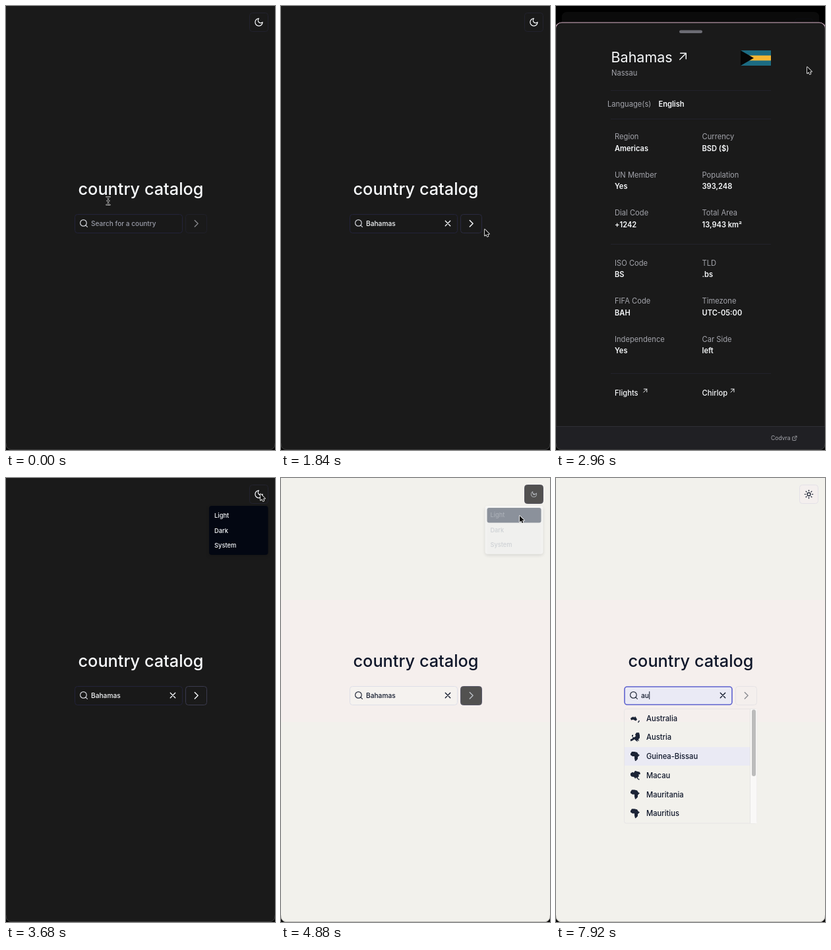
Recreate the animation shown at these times as an HTML page with a canvas. Size 408x670 px, loop 8000 ms.

```html
<!DOCTYPE html>
<html lang="en">
<head>
<meta charset="utf-8">
<title>country catalog</title>
<style>
html, body { margin: 0; width: 100%; height: 100%; overflow: hidden; background: #000; }
canvas { display: block; width: 408px; height: 670px; }
</style>
</head>
<body>
<canvas id="stage"></canvas>
<script>
const W = 408, H = 670, LOOP = 8000;
const canvas = document.getElementById('stage');
const ctx = canvas.getContext('2d');
const dpr = window.devicePixelRatio || 1;
canvas.width = W * dpr;
canvas.height = H * dpr;

const T = { focus: 320, pick: 1280, open: 2060, close: 3110, menu: 3600, theme: 4840, clear: 5760, type: 6230 };

const QUERY = [[0, ''], [480, 'b'], [640, 'ba'], [800, 'bah'], [T.pick, 'Bahamas'],
  [T.clear, ''], [T.type, 'a'], [7200, 'au']];

// Each row: country, then the initial of its continent
const RESULTS = {
  b: { total: 50, rows: 'Albania e|Antigua and Barbuda m|Aruba m|Azerbaijan s|Bahamas m|Bahrain s' },
  ba: { total: 20, rows: 'Albania e|Antigua and Barbuda m|Azerbaijan s|Bahamas m|Bahrain s|Bangladesh s' },
  bah: { total: 2, rows: 'Bahamas m|Bahrain s' },
  a: { total: 206, rows: 'Afghanistan s|Albania e|Algeria f|American Samoa o|Andorra e|Angola f' },
  au: { total: 10.2, rows: 'Australia o|Austria e|Guinea-Bissau f|Macau s|Mauritania f|Mauritius f' }
};

const LAND = {
  s: 'M1 5 4 3 6 4 8 1 11 2 15 3 16 6 13 7 14 9 12 11 13 14 11 13 10 11 8 13 7 11 5 10 3 10 1 8ZM13 13l2 1-1 1-2-1Z',
  e: 'M10 1 14 1 15 5 15 9 13 11 14 14 11 12 12 15 9 13 7 11 4 13 1 14 1 11 4 10 4 8 7 8 9 6 8 4ZM3 5l2-1 0 3-2 0Z',
  f: 'M3 1 7 1 11 2 13 5 15 6 12 9 12 12 9 15 8 15 7 11 7 8 4 8 1 6 1 4Z',
  o: 'M1 8 4 6 6 6 7 7 8 5 10 8 11 10 9 12 7 11 5 10 2 11ZM14 11l1 1-2 3-1-1Z',
  m: 'M2 1 10 1 11 3 8 5 6 6 8 8 12 10 11 12 9 15 8 15 8 11 6 8 4 6 3 4 1 3Z'
};

const ICON = {
  moon: 'M12 3a6 6 0 0 0 9 9 9 9 0 1 1-9-9Z',
  sun: 'M16 12a4 4 0 1 1-8 0 4 4 0 1 1 8 0M12 2v2M12 20v2M2 12h2M20 12h2M4.9 4.9l1.4 1.4M17.7 17.7l1.4 1.4M4.9 19.1l1.4-1.4M17.7 6.3l1.4-1.4',
  search: 'M19 11a8 8 0 1 1-16 0 8 8 0 1 1 16 0M21 21l-4.3-4.3',
  cross: 'M18 6 6 18M6 6l12 12',
  chevron: 'M9 18l6-6-6-6',
  arrow: 'M7 17 17 7M8 7h9v9',
  external: 'M18 13v6a2 2 0 0 1-2 2H5a2 2 0 0 1-2-2V8a2 2 0 0 1 2-2h6M15 3h6v6M10 14 21 3'
};

// Pointer path: time, x, y
const PATH = [
  [80, 155, 290], [320, 165, 328], [1040, 165, 328], [1200, 160, 362], [T.pick, 160, 362],
  [1700, 309, 337], [1850, 309, 337], [2000, 290, 330], [2120, 290, 330], [2880, 381, 92],
  [2970, 381, 92], [3090, 384, 14], [3200, 384, 14], [3480, 386, 24], [3800, 386, 24],
  [4200, 362, 57], [5250, 362, 57], [5720, 252, 326], [5900, 252, 326], [6120, 200, 328]
];

const clamp = x => Math.max(0, Math.min(1, x));
const smooth = x => x * x * (3 - 2 * x);
const span = (t, start, length) => clamp((t - start) / length);
const glide = x => 1 - Math.pow(1 - x, 3.6);

function mix(a, b, p) {
  const part = (c, i) => parseInt(c.substr(1 + 2 * i, 2), 16);
  return 'rgb(' + [0, 1, 2].map(i => Math.round(part(a, i) + (part(b, i) - part(a, i)) * p)) + ')';
}

function latest(list, t) {
  return list.filter(e => e[0] <= t).pop()[1];
}

function pointerAt(t) {
  const i = PATH.findIndex(k => k[0] > t);
  if (i === 0) return PATH[0].slice(1);
  if (i < 0) return PATH[PATH.length - 1].slice(1);
  const a = PATH[i - 1], b = PATH[i], p = smooth(span(t, a[0], b[0] - a[0]));
  return [a[1] + (b[1] - a[1]) * p, a[2] + (b[2] - a[2]) * p];
}

function text(str, x, y, size, color, weight = 400) {
  ctx.font = `${weight} ${size}px Inter, sans-serif`;
  ctx.fillStyle = color;
  ctx.fillText(str, x, y);
  return ctx.measureText(str).width;
}

function rect(x, y, w, h, color) {
  ctx.fillStyle = color;
  ctx.fillRect(x, y, w, h);
}

function box(x, y, w, h, r, fill, stroke, line = 1) {
  ctx.beginPath();
  ctx.roundRect(x, y, w, h, r);
  if (fill) { ctx.fillStyle = fill; ctx.fill(); }
  if (stroke) { ctx.strokeStyle = stroke; ctx.lineWidth = line; ctx.stroke(); }
}

function icon(name, cx, cy, scale, color, line = 2, turn = 0) {
  if (scale <= 0) return;
  ctx.save();
  ctx.translate(cx, cy);
  ctx.rotate(turn);
  ctx.scale(scale, scale);
  ctx.translate(-12, -12);
  ctx.strokeStyle = color;
  ctx.lineWidth = line;
  ctx.lineCap = ctx.lineJoin = 'round';
  ctx.stroke(new Path2D(ICON[name]));
  ctx.restore();
}

function drawList(query, t, light, ink) {
  const { total, rows } = RESULTS[query];
  const items = rows.split('|'), pitch = 28.75;
  const scroll = total > 6;
  const height = scroll ? 173 : items.length * pitch + 2;
  box(103.5, 348.5, 201, height - 0.5, 3, light ? null : '#1a1a1a', light ? '#e7e5e5' : '#242430');

  let active = -1;
  if (t >= 1160 && t < T.pick) active = 0;
  if (t >= 7520) active = Math.min(2, Math.floor((t - 7520) / 160));
  if (active >= 0) {
    rect(104, 348.5 + active * pitch, scroll ? 190 : 200, 28, light ? '#eaeaf4' : '#25253a');
  }

  items.forEach((item, i) => {
    const y = 362.5 + i * pitch;
    ctx.save();
    ctx.translate(112, y - 8);
    ctx.fillStyle = light ? '#1c2436' : '#e6e8ee';
    ctx.fill(new Path2D(LAND[item.slice(-1)]));
    ctx.restore();
    text(item.slice(0, -2), 137, y + 4, 11.2, ink, 500);
  });

  if (scroll) {
    rect(294, 349, 10.5, height - 1, light ? '#f9f8f7' : '#252525');
    rect(294, 349, 1, height - 1, light ? '#e6e5e4' : '#303030');
    box(297, 349.5, 6, Math.max(13, 171 * 6 / total), 3, light ? '#bcbcbc' : '#6a6a6a');
  }
}

function drawSearch(t, query, light, p, ink) {
  const focus = (t >= T.focus && t < T.pick) || t >= T.clear;
  if (focus) {
    box(104, 315, 163, 27, 4, light ? '#eaeaf5' : '#1e1e30', light ? '#5f63cf' : '#5a5cc4', 1.6);
  } else {
    box(104.5, 314.5, 163, 28, 4, light ? '#f5f2ef' : '#191919', light ? '#dedfe8' : '#23233a');
  }
  icon('search', 118, 328, 0.6, light ? '#252c3c' : '#d4d6dc');

  let end = 129;
  if (query) {
    end += text(query, 129, 331.6, 10.2, ink, 500);
    icon('cross', 253, 328, 0.62, ink, 2.2);
  } else {
    text('Search for a country', 129, 331.6, 10.1, light ? '#868b99' : '#9a9ca8', 500);
  }
  if (focus) rect(end + 0.3, 322, 1, 12, ink);

  const ready = query === 'Bahamas';
  let edge = ready ? '#2a2a40' : '#20202a';
  if (t >= T.close && t < 3760) edge = '#3a3a4e';
  box(272.5, 314.5, 32, 28, 4, mix('#1a1a1a', '#f4efed', p), mix(edge, '#e6e3e5', p));
  icon('chevron', 288.7, 328.3, 0.8, ready ? mix('#f8fafc', '#0f172a', p) : light ? '#8b8d92' : '#85868a', 1.8);
}

function drawThemeButton(t, p) {
  if (t >= 5060 && t < T.clear) box(368, 9, 32, 32, 6, null, '#8b8ed2', 1.4);
  box(369.5, 10.5, 28, 28, 4, mix('#1a1a1a', '#f4efee', p), mix('#22222e', '#e4e1e7', p));
  const color = mix('#f8fafc', '#0f172a', p);
  icon('moon', 383.5, 24.5, 0.62 * (1 - p), color, 2, -p * Math.PI / 2);
  icon('sun', 383.5, 24.5, 0.62 * p, color, 2, (1 - p) * Math.PI / 2);
}

function drawMenu(t, light, p, hover) {
  const alpha = span(t, T.menu, 80) * clamp(1 - p * 1.4);
  if (!alpha) return;
  const scale = 0.95 + 0.05 * alpha;
  ctx.save();
  ctx.globalAlpha = alpha;
  ctx.translate(398, 42);
  ctx.scale(scale, scale);
  ctx.translate(-398, -42);
  ctx.shadowColor = 'rgba(0,0,0,.18)';
  ctx.shadowBlur = 5;
  ctx.shadowOffsetY = 2;
  box(308, 42, 89.5, 74, 4, light ? '#ffffff' : '#030712');
  ctx.shadowColor = 'transparent';
  if (hover) box(311, 45, 83.5, 23, 3, mix('#1e293b', '#f1f5f9', p));
  ['Light', 'Dark', 'System'].forEach((label, i) =>
    text(label, 316, 59.7 + i * 22.8, 9.4, mix('#f8fafc', '#0f172a', p), 500));
  ctx.restore();
}

function drawPage(t, pointer) {
  const light = t >= T.theme;
  const p = smooth(span(t, T.theme - 12, 160));
  const ink = light ? '#0f172a' : '#f8fafc';
  const query = latest(QUERY, t);
  rect(0, 0, W, H, light ? '#f2f1ec' : '#1a1a1a');
  if (light) rect(0, 184, W, 184, '#f5efed');
  text('country catalog', 109.5, 285.3, 25.3, ink, 500);
  drawSearch(t, query, light, p, ink);
  if (RESULTS[query]) drawList(query, t, light, ink);
  drawThemeButton(t, p);
  drawMenu(t, light, p, pointer[1] > 46);
}

function drawFlag(x, y, w, h) {
  rect(x, y, w, h, '#1c6b82');
  rect(x, y + h / 3, w, h / 3, '#f6b633');
  ctx.fillStyle = '#050505';
  ctx.beginPath();
  ctx.moveTo(x, y);
  ctx.lineTo(x + 20, y + h / 2);
  ctx.lineTo(x, y + h);
  ctx.fill();
}

function drawDrawer(offset) {
  const ink = '#f8fafc', soft = '#a3a4ab';
  const pair = (x, y, label, value) => {
    text(label, x, y, 11.2, soft);
    text(value, x, y + 17.5, 11.1, ink, 600);
  };
  const blocks = [
    [201.3, 'Region|Americas|Currency|BSD ($)', 'UN Member|Yes|Population|393,248', 'Dial Code|+1242|Total Area|13,943 km²'],
    [391.6, 'ISO Code|BS|TLD|.bs', 'FIFA Code|BAH|Timezone|UTC-05:00', 'Independence|Yes|Car Side|left']
  ];
  ctx.save();
  ctx.translate(0, offset);
  box(0, 25, W, 700, [9, 9, 0, 0], '#1a1a1a');
  box(-0.5, 25, W + 1, 700, [9, 9, 0, 0], null, '#d9b4c8', 1.2);
  box(187, 36.5, 35, 4.5, 2.2, '#6c6c74');

  text('Bahamas', 83.5, 85.3, 21.5, ink);
  icon('arrow', 192.5, 76, 0.95, ink, 1.5);
  text('Nassau', 84, 105, 11.2, soft);
  drawFlag(280, 67, 46, 23);
  text('Language(s)', 78, 151.8, 11.2, soft);
  text('English', 155.5, 151.8, 11.1, ink, 600);
  [127, 170, 359, 554].forEach(y => rect(83, y, 243, 1, '#22222b'));

  blocks.forEach(([top, ...rows]) => rows.forEach((row, i) => {
    const [a, b, c, d] = row.split('|');
    pair(89, top + i * 57.5, a, b);
    pair(221.5, top + i * 57.5, c, d);
  }));

  text('Flights', 89, 588.4, 11.2, ink, 500);
  icon('arrow', 135.3, 580.5, 0.5, ink, 1.9);
  text('Chirlop', 221.5, 588.4, 11.2, ink, 500);
  icon('arrow', 267.5, 580.5, 0.5, ink, 1.9);

  rect(0, 634, W, 100, '#202024');
  rect(0, 634, W, 1, '#2f2f35');
  text('Codvra', 326, 655.2, 8.6, '#a6a7ad');
  icon('external', 361.8, 652.3, 0.36, '#a6a7ad', 2.4);
  ctx.restore();
}

function drawPointer([x, y], beam) {
  ctx.save();
  ctx.translate(x, y);
  ctx.lineJoin = ctx.lineCap = 'round';
  if (beam) {
    const shape = new Path2D('M-2.5-2Q0-2 0 0Q0-2 2.5-2M0 0V8M-1.5 4H1.5M-2.5 10Q0 10 0 8Q0 10 2.5 10');
    ctx.strokeStyle = '#e8e8e8';
    ctx.lineWidth = 2.2;
    ctx.stroke(shape);
    ctx.strokeStyle = '#111';
    ctx.lineWidth = 1;
    ctx.stroke(shape);
  } else {
    const shape = new Path2D('M0 0V9.6L2.2 7.6 3.8 11 5.4 10.3 3.9 7H7Z');
    ctx.strokeStyle = '#fff';
    ctx.lineWidth = 1.6;
    ctx.stroke(shape);
    ctx.fillStyle = '#0a0a0a';
    ctx.fill(shape);
  }
  ctx.restore();
}

function drawCorners(light) {
  ctx.fillStyle = '#000';
  ctx.beginPath();
  ctx.rect(0, H - 20, W, 20);
  ctx.roundRect(0, H - 40, W, 39.5, [0, 0, 8, 8]);
  ctx.fill('evenodd');
}

function drawFrameEdge(light) {
  ctx.save();
  ctx.beginPath();
  ctx.rect(0, H - 10, W, 10);
  ctx.clip();
  ctx.fillStyle = '#050505';
  ctx.beginPath();
  ctx.rect(0, H - 10, W, 10);
  ctx.roundRect(0, H - 60, W, 60, [0, 0, 8, 8]);
  ctx.fill('evenodd');
  box(0, H - 60, W, 59.5, [0, 0, 8, 8], null, light ? '#b9b8b4' : '#3c3c3c');
  ctx.restore();
}

function draw(t) {
  const pointer = pointerAt(t);
  const closing = t >= T.close;
  const shown = closing ? 1 - glide(span(t, T.close, 400)) : glide(span(t, T.open, 500));

  ctx.setTransform(dpr, 0, 0, dpr, 0, 0);
  rect(0, 0, W, H, '#000');
  ctx.save();
  if (shown > 0) {
    const scale = 1 - 0.042 * shown;
    ctx.translate(W * (1 - scale) / 2, 9 * shown);
    ctx.scale(scale, scale);
    ctx.beginPath();
    ctx.roundRect(0, 0, W, H, 8 * shown);
    ctx.clip();
  }
  drawPage(t, pointer);
  ctx.restore();

  if (shown > 0) {
    rect(0, 0, W, H, `rgba(0,0,0,${0.58 * shown})`);
    drawDrawer((1 - shown) * (H - 25));
  }
  drawFrameEdge(t >= T.theme);

  const [x, y] = pointer;
  const overTitle = x > 108 && x < 300 && y > 262 && y < 300;
  const overInput = x > 104 && x < 244 && y > 314 && y < 343;
  const typing = (t >= 480 && t < 1040) || t >= T.type;
  if (!typing) drawPointer(pointer, shown === 0 && (overTitle || overInput));
}

function tick(now) {
  draw(now % LOOP);
  requestAnimationFrame(tick);
}
requestAnimationFrame(tick);
</script>
</body>
</html>
```
